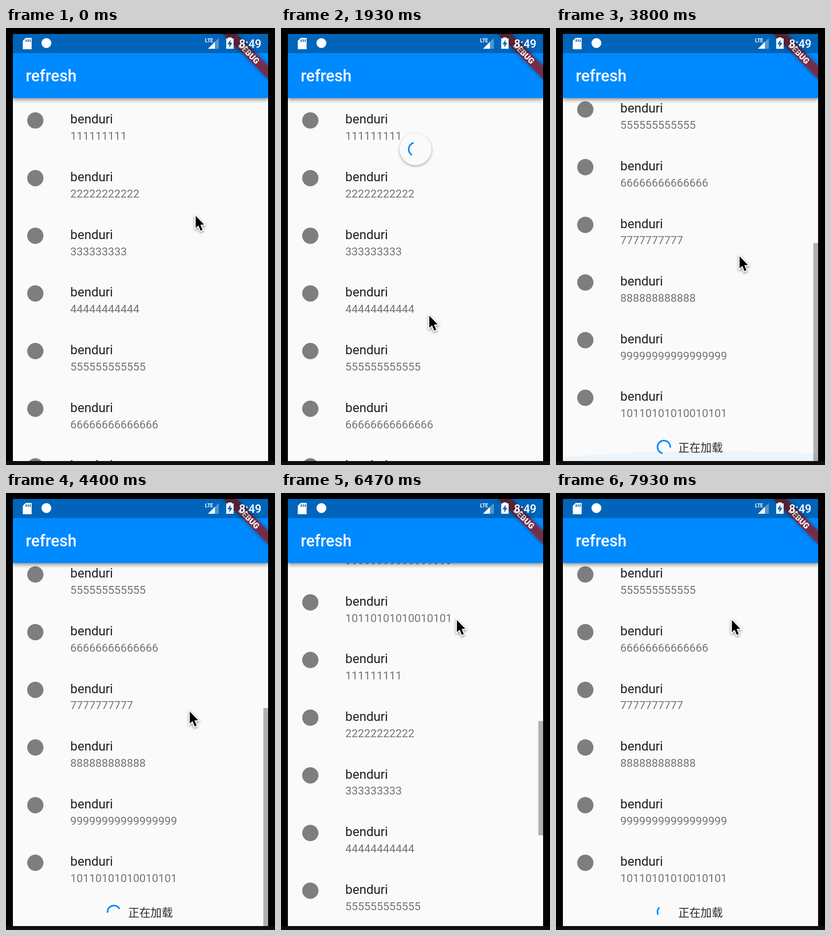
Animation of 546x884 px, one loop 8 s. Source, as an HTML page with a canvas:

```html
<!DOCTYPE html>
<html lang="zh-CN">
<head>
<meta charset="utf-8">
<title>refresh</title>
<style>
  html, body { margin: 0; height: 100%; overflow: hidden; background: #000; }
  canvas { display: block; }
</style>
</head>
<body>
<canvas width="546" height="884"></canvas>
<script>
const ctx = document.querySelector('canvas').getContext('2d');
const LOOP = 8000, DP = 1.62;
const LEFT = 14, TOP = 12, RIGHT = 532, BOTTOM = 876, WIDTH = RIGHT - LEFT;
const LIST_TOP = 141.6, VIEW = BOTTOM - LIST_TOP;
const ROW = 72 * DP, FOOTER = 35 * DP;
const BLUE = '#008aff', PAPER = '#fafafa';
const LABELS = ['111111111', '22222222222', '333333333', '44444444444', '555555555555',
  '66666666666666', '7777777777', '888888888888', '99999999999999999', '10110101010010101'];
const END_10 = 10 * ROW - VIEW, END_20 = 20 * ROW - VIEW;

const clamp = x => Math.max(0, Math.min(1, x));
const ramp = (t, a, b) => clamp((t - a) / (b - a));
const smooth = x => x * x * (3 - 2 * x);
const easeOut = x => 1 - (1 - x) ** 2;
const linear = x => x;

// Value at time t of a track of [time, value] keys.
function track(t, keys, ease = smooth) {
  if (t <= keys[0][0]) return keys[0][1];
  for (let i = 1; i < keys.length; i++) {
    const [a, from] = keys[i - 1], [b, to] = keys[i];
    if (t < b) return from + (to - from) * ease((t - a) / (b - a));
  }
  return keys[keys.length - 1][1];
}

// cubic-bezier(.4, 0, .2, 1)
function fastOutSlowIn(x) {
  let lo = 0, hi = 1;
  for (let i = 0; i < 20; i++) {
    const s = (lo + hi) / 2, r = 1 - s;
    if (1.2 * r * r * s + 0.6 * r * s * s + s ** 3 < x) lo = s; else hi = s;
  }
  return 3 * lo * lo - 2 * lo ** 3;
}

const cursorX = t => track(t, [[70, 385], [500, 312], [1050, 301], [3270, 301], [3560, 368],
  [3850, 373], [5060, 373], [5530, 264], [6130, 264], [6420, 357]]);
const cursorY = t => track(t, [[70, 380], [500, 818], [1050, 582], [2940, 582], [3100, 690],
  [3270, 206], [3600, 640], [3850, 442], [5060, 442], [5530, 598], [6130, 598], [6420, 257]]);

function scrollAt(t) {
  if (t < 3600) return END_10 * smooth(ramp(t, 3120, 3265));
  if (t < 6000) return END_10 + FOOTER * easeOut(ramp(t, 3680, 3770));
  return track(t, [[6170, END_10 + FOOTER], [6380, 860], [6812, END_20], [6890, END_20 + FOOTER]],
    linear);
}

function text(str, x, y, size, color, weight = 400, family = 'Roboto') {
  ctx.font = `${weight} ${size}px ${family}, sans-serif`;
  ctx.fillStyle = color;
  ctx.fillText(str, x, y);
}

function disc(x, y, r, color) {
  ctx.fillStyle = color;
  ctx.beginPath();
  ctx.arc(x, y, r, 0, 2 * Math.PI);
  ctx.fill();
}

function polygon(points, color) {
  ctx.fillStyle = color;
  ctx.beginPath();
  points.forEach(([x, y]) => ctx.lineTo(x, y));
  ctx.closePath();
  ctx.fill();
}

function rect(x, y, w, h, color) {
  ctx.fillStyle = color;
  ctx.fillRect(x, y, w, h);
}

function shadow(color, blur, dy) {
  ctx.shadowColor = color;
  ctx.shadowBlur = blur;
  ctx.shadowOffsetY = dy;
}

// Indeterminate progress arc; `turns` counts grow-and-shrink cycles. Returns its end angle.
function progressArc(x, y, r, turns) {
  const cycle = Math.floor(turns), p = turns - cycle;
  const head = fastOutSlowIn(clamp(p * 2)), tail = fastOutSlowIn(clamp(p * 2 - 1));
  const start = Math.PI * (-0.5 + 1.5 * tail + 1.7 * p - 0.8 * (cycle % 5));
  const end = start + Math.max(1.5 * Math.PI * (head - tail), 0.001);
  ctx.strokeStyle = BLUE;
  ctx.lineWidth = 2 * DP;
  ctx.lineCap = 'square';
  ctx.beginPath();
  ctx.arc(x, y, r, start, end);
  ctx.stroke();
  return end;
}

function drawList(t, scroll, count, footerStart) {
  for (let i = 0; i < count; i++) {
    const y = LIST_TOP + i * ROW - scroll;
    if (y > BOTTOM || y + ROW < LIST_TOP) continue;
    disc(59.5, y + 45.4, 16.5, '#7e7e7e');
    text('benduri', 130.6, y + 51.8, 16 * DP, '#212121');
    text(LABELS[i % 10], 130.6, y + 84.7, 14 * DP, '#757575');
  }
  if (footerStart !== null) {
    const y = LIST_TOP + count * ROW - scroll + FOOTER / 2;
    progressArc(219, y, 13, (t - footerStart) / 1000);
    text('正在加载', 248, y + 9.2, 14 * DP, '#2b2b2b', 400, '"Noto Sans CJK SC", "Noto Sans CJK"');
  }
}

function drawRefreshBubble(t) {
  if (t > 2710) return;
  const pull = t < 500 ? clamp((cursorY(t) - 409) / (VIEW / 4)) : 1;
  if (pull === 0) return;
  const position = 1.5 * pull - 0.5 * ramp(t, 506, 618);
  const scale = 1 - ramp(t, 2560, 2710), r = 8.5 * DP;
  ctx.save();
  ctx.translate(273, LIST_TOP + (88 * position - 24) * DP);
  ctx.scale(scale, scale);
  shadow('rgba(0,0,0,.35)', 5, 2);
  disc(0, 0, 32.4, PAPER);
  shadow('transparent', 0, 0);
  if (t < 618) {
    ctx.globalAlpha = clamp(pull * 1.5);
    ctx.rotate(progressArc(0, 0, r, pull * 0.375));
    const size = 3 * DP * pull;
    polygon([[r - size, 0], [r + size, 0], [r, size * 1.4]], BLUE);
  } else {
    progressArc(0, 0, r, 0.375 + (t - 618) / 1000);
  }
  ctx.restore();
}

function drawGlow(t) {
  const late = t > 6000;
  const size = late
    ? track(t, [[6880, 0.5], [6930, 0.94], [6980, 1], [7060, 1], [7510, 0]])
    : track(t, [[3760, 0], [3850, 0.45], [3900, 0.45], [4340, 0]]);
  const alpha = late
    ? track(t, [[6880, 0], [6930, 0.224], [6980, 0.25], [7060, 0.25], [7510, 0]])
    : track(t, [[3760, 0], [3850, 0.12], [3900, 0.12], [4340, 0]]);
  if (alpha <= 0) return;
  const radius = WIDTH * 1.5, height = WIDTH * 0.75 * (2 - Math.sqrt(3));
  ctx.save();
  ctx.globalAlpha = alpha;
  ctx.translate(late ? 315 : 323, BOTTOM);
  ctx.scale(1, -size);
  disc(0, height - radius, radius, BLUE);
  ctx.restore();
}

function drawScrollbar(t, scroll, content) {
  const alpha = track(t, [[3140, 0], [3365, 1], [4410, 1], [4635, 0],
    [6170, 0], [6395, 1], [7600, 1], [7825, 0]], linear);
  rect(522.3, LIST_TOP + scroll / content * VIEW, RIGHT - 522.3, VIEW * VIEW / content,
    `rgba(0,0,0,${0.295 * alpha})`);
}

function drawBanner() {
  ctx.save();
  ctx.translate(RIGHT, TOP);
  ctx.rotate(Math.PI / 4);
  shadow('rgba(0,0,0,.5)', 9, 0);
  rect(-40 * DP, 28 * DP, 80 * DP, 12 * DP, 'rgba(160,28,38,.72)');
  shadow('transparent', 0, 0);
  ctx.textAlign = 'center';
  text('DEBUG', 0, 34 * DP + 5.9, 10.2 * DP, '#fff', 900);
  ctx.restore();
}

function drawStatusIcons() {
  const scrim = '#0066b6';
  polygon([[40, 20], [52, 20], [52, 43], [34, 43], [34, 26]], '#fff');
  [40, 44, 48].forEach(x => rect(x, 23, 2, 5, scrim));
  disc(82, 30.5, 10, '#fff');
  text('LTE', 404, 29, 10, '#fff', 700);
  polygon([[410, 42], [432, 42], [432, 20]], 'rgba(255,255,255,.32)');
  polygon([[410, 42], [424, 42], [424, 28]], '#fff');
  rect(447, 21, 15, 21, '#fff');
  rect(451, 19, 7, 3, '#fff');
  polygon([[456, 23.5], [449.5, 33], [453.5, 33], [453, 39.5], [459.5, 30], [455.5, 30]], scrim);
  text('8:49', 473, 40, 23, '#fff', 500);
}

function drawBars() {
  ctx.save();
  shadow('rgba(0,0,0,.45)', 8, 3);
  rect(LEFT, TOP, WIDTH, LIST_TOP - TOP, BLUE);
  ctx.restore();
  text('refresh', 40, 107.7, 20 * DP, '#fff', 500);
  drawBanner();
  rect(LEFT, TOP, WIDTH, 24 * DP, 'rgba(0,0,0,.27)');
  drawStatusIcons();
}

function drawCursor(x, y) {
  ctx.save();
  ctx.translate(x, y);
  ctx.beginPath();
  [[0, 0], [0, 24.5], [5.6, 19.4], [10, 30], [14, 28.2], [9.6, 18], [17, 17.6]]
    .forEach(([px, py]) => ctx.lineTo(px, py));
  ctx.closePath();
  ctx.lineWidth = 4;
  ctx.strokeStyle = '#fff';
  shadow('rgba(0,0,0,.45)', 5, 2);
  ctx.stroke();
  shadow('transparent', 0, 0);
  ctx.fillStyle = '#000';
  ctx.fill();
  ctx.restore();
}

function draw(t) {
  const count = t < 5220 ? 10 : 20;
  const footerStart = t >= 3280 && t < 5220 ? 3220 : t >= 6812 ? 6812 : null;
  const content = count * ROW + (footerStart === null ? 0 : FOOTER);
  const scroll = scrollAt(t);

  rect(0, 0, 546, 884, '#000');
  rect(0, BOTTOM, 546, 8, '#0e0e0e');
  ctx.save();
  ctx.beginPath();
  ctx.rect(LEFT, TOP, WIDTH, BOTTOM - TOP);
  ctx.clip();
  rect(LEFT, TOP, WIDTH, BOTTOM - TOP, PAPER);
  drawList(t, scroll, count, footerStart);
  drawRefreshBubble(t);
  drawGlow(t);
  drawScrollbar(t, scroll, content);
  drawBars();
  ctx.restore();
  drawCursor(cursorX(t), cursorY(t));
}

function frame() {
  draw(performance.now() % LOOP);
  requestAnimationFrame(frame);
}
frame();
</script>
</body>
</html>
```
